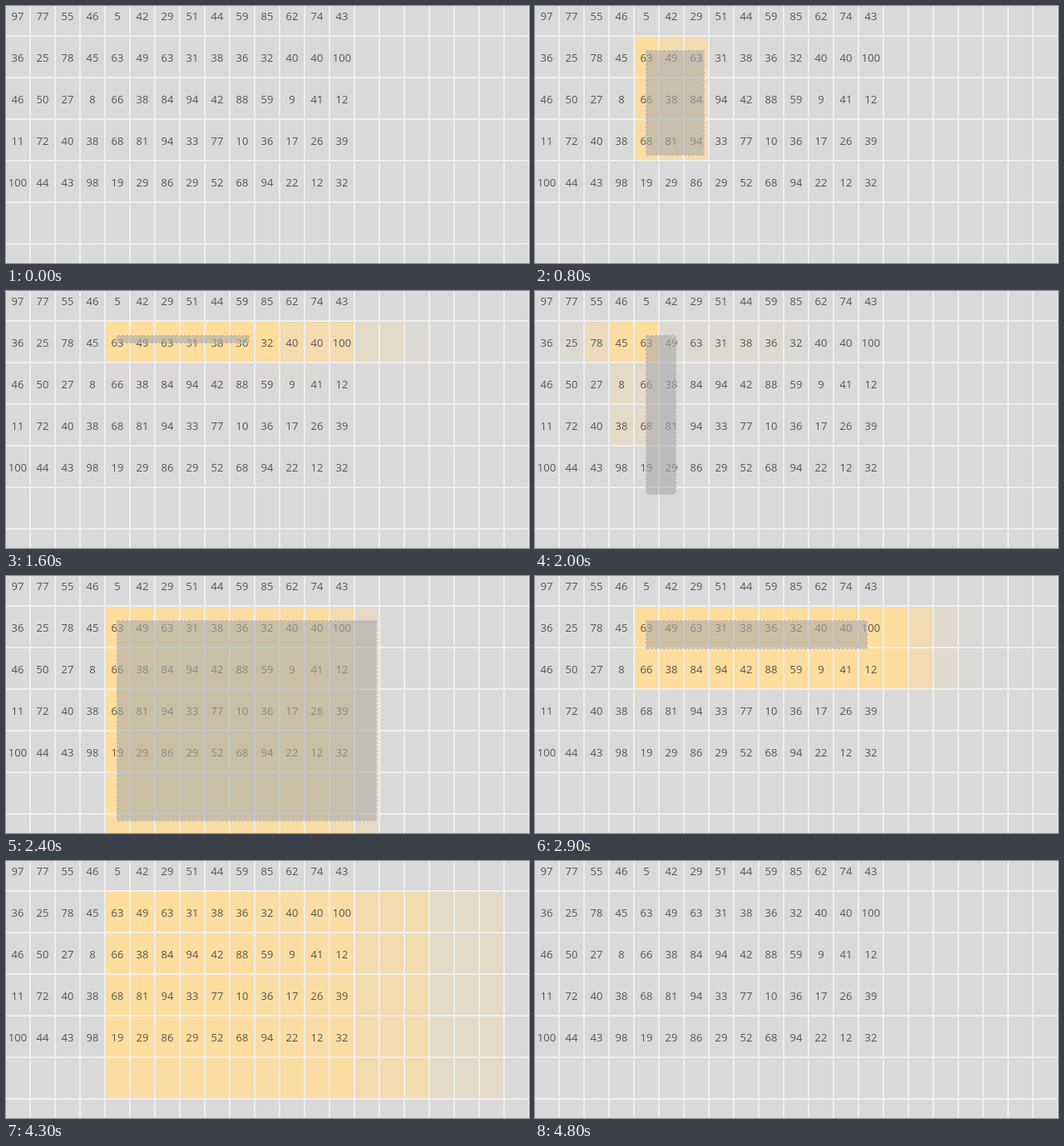
Animation, 629 px wide and 309 px high, one loop 5.5 s. Source, as an HTML page with a canvas:

```html
<!DOCTYPE html>
<html lang="en">
<head>
<meta charset="utf-8">
<title>Grid selection</title>
<style>
  html, body { margin: 0; width: 100%; height: 100%; overflow: hidden; background: #eee; }
  canvas { display: block; width: 629px; height: 309px; }
</style>
</head>
<body>
<canvas width="629" height="309"></canvas>
<script>
const ctx = document.querySelector('canvas').getContext('2d');
const COLS = 21, ROWS = 7, LOOP = 5500, STEP = 100;
const PLAIN = [217, 217, 217], PICKED = [255, 221, 157];
const numbers = [
  '97 77 55 46 5 42 29 51 44 59 85 62 74 43',
  '36 25 78 45 63 49 63 31 38 36 32 40 40 100',
  '46 50 27 8 66 38 84 94 42 88 59 9 41 12',
  '11 72 40 38 68 81 94 33 77 10 36 17 26 39',
  '100 44 43 98 19 29 86 29 52 68 94 22 12 32'
].map(row => row.split(' '));

// The pointer drags from ORIGIN, one position per step.
const ORIGIN = [133, 53], PRESS = 4;
const pointer = (
  '137,57 141,140 182,150 192,165 204,180 256,235 380,262 520,150 500,80 478,70 ' +
  '415,66 325,64 293,63 45,62 65,75 100,150 170,245 382,297 412,304 436,302 ' +
  '446,295 515,125 500,115 475,105 440,96 400,88 250,86 140,110 70,192 64,198 ' +
  '20,176 6,164 8,158 14,157 175,205 292,237 400,265 500,280 580,250'
).split(' ').map(p => p.split(',').map(Number));

// Progress of a 500 ms CSS "ease" after each elapsed step.
const EASE = [0, 0.295, 0.682, 0.885, 0.976, 1];

function lassoAt(step) {
  const p = pointer[step - PRESS];
  return p && {
    left: Math.min(p[0], ORIGIN[0]), right: Math.max(p[0], ORIGIN[0]),
    top: Math.min(p[1], ORIGIN[1]), bottom: Math.max(p[1], ORIGIN[1])
  };
}

function highlight(x, y, lassos) {
  let from = 0, target = 0, since = 0;
  const value = step => from + (target - from) * EASE[Math.min(step - since, 5)];
  lassos.forEach((box, step) => {
    const inside = box && box.left < x + 28 && box.right > x &&
      box.top < y + 48 && box.bottom > y ? 1 : 0;
    if (inside !== target) {
      from = value(step);
      target = inside;
      since = step;
    }
  });
  return value(lassos.length - 1);
}

function drawLasso({ left, right, top, bottom }) {
  const w = right - left, h = bottom - top;
  ctx.fillStyle = 'rgba(170,170,170,.6)';
  ctx.fillRect(left + 1, top + 1, w - 2, h - 2);
  ctx.strokeStyle = '#b8b8b8';
  ctx.setLineDash([3, 2]);
  ctx.beginPath();
  for (const y of [top + 0.5, bottom - 0.5]) {
    ctx.moveTo(left + 1, y);
    ctx.lineTo(right - 1, y);
  }
  for (const x of [left + 0.5, right - 0.5]) {
    ctx.moveTo(x, top + 1);
    ctx.lineTo(x, bottom - 1);
  }
  ctx.stroke();
}

function draw(step) {
  const lassos = Array.from({ length: step + 1 }, (_, i) => lassoAt(i));
  ctx.fillStyle = '#eee';
  ctx.fillRect(0, 0, 629, 309);
  ctx.font = '13px "Open Sans", "Noto Sans", sans-serif';
  ctx.textAlign = 'center';
  for (let row = 0; row < ROWS; row++) {
    for (let col = 0; col < COLS; col++) {
      const x = col * 30, y = row * 50 - 13;
      const mix = highlight(x, y, lassos);
      ctx.fillStyle = `rgb(${PLAIN.map((c, i) => Math.round(c + (PICKED[i] - c) * mix))})`;
      ctx.fillRect(x, y, 28, 48);
      ctx.fillStyle = '#555';
      ctx.fillText(numbers[row]?.[col] ?? '', x + 14, y + 30);
    }
  }
  if (lassos[step]) drawLasso(lassos[step]);
}

let shown = -1;
function frame(now) {
  let step = Math.floor(now % LOOP / STEP);
  // The fade pauses for one step, then stays at its last trace.
  if (step > 45) step = Math.min(step - 1, 47);
  if (step !== shown) draw(shown = step);
  requestAnimationFrame(frame);
}
frame(performance.now());
</script>
</body>
</html>
```
